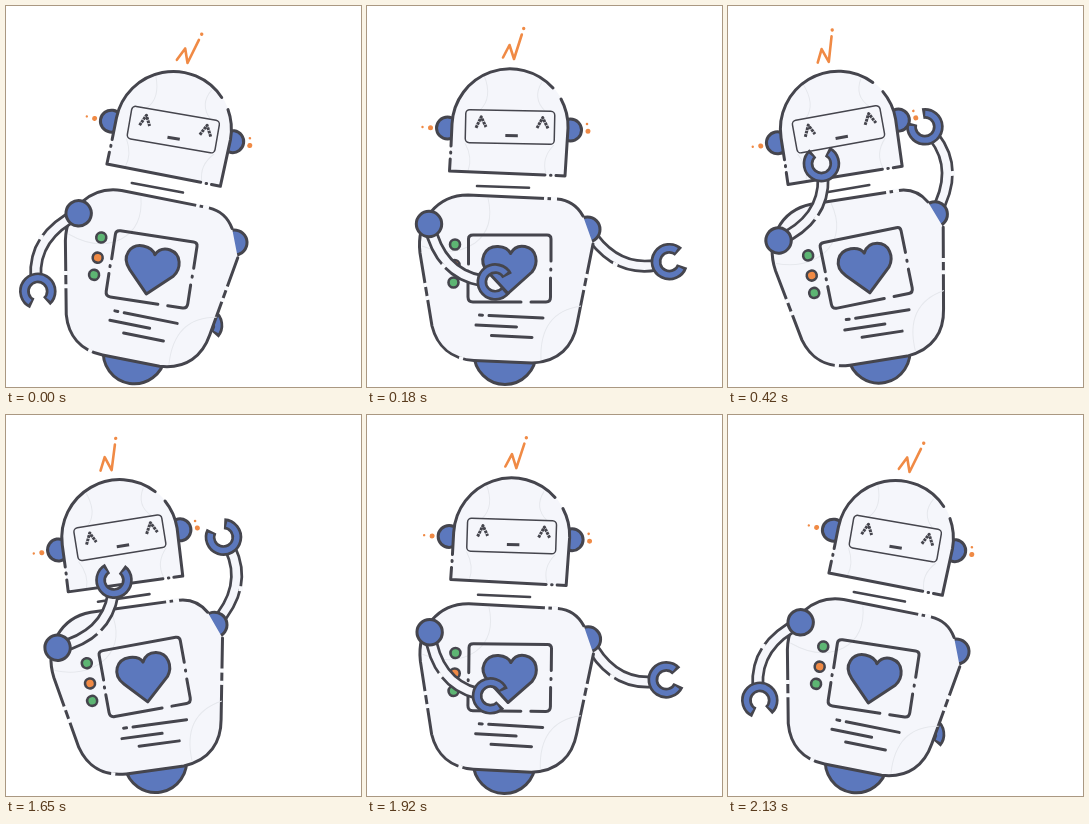
An HTML page that plays this animation: 355 by 381 pixels, repeating every 2610 ms.

```html
<!DOCTYPE html>
<html lang="en">
<head>
<meta charset="utf-8">
<title>Robot</title>
<style>
  html, body { margin: 0; width: 100%; height: 100%; overflow: hidden; background: #fff; }
  svg { display: block; }
  .line { fill: none; stroke: #45454d; stroke-width: 3; stroke-linecap: round; stroke-linejoin: round; }
  .thin { stroke-width: 1.5; }
  .flat { stroke-linecap: butt; }
  .shell { fill: #f5f6fb; }
  .blue { fill: #5c78bd; stroke: #45454d; stroke-width: 3; stroke-linejoin: round; }
  .gap { fill: none; stroke: #f8f9fc; stroke-width: 4.4; }
  .faint { fill: none; stroke: #e6e8ed; }
  .orange { fill: #f08a45; }
  .light { stroke: #45454d; stroke-width: 2.6; }
  .green { fill: #5db573; }
  .bolt { fill: none; stroke: #f08a45; stroke-width: 2.6; stroke-linecap: round; stroke-linejoin: round; }
</style>
</head>
<body>
<svg width="355" height="381" viewBox="0 0 355 381">
  <defs>
    <g id="limb">
      <path d="M0 0Q41 30 77 8" fill="none" stroke="#45454d" stroke-width="13"/>
      <path d="M0 0Q41 30 77 8" fill="none" stroke="#f5f6fb" stroke-width="7.6"/>
      <path class="gap" d="M36 22.5h5"/>
      <g id="claw" transform="translate(88 0) rotate(-36)" fill="none"></g>
    </g>
  </defs>
  <g id="robot">
    <g transform="translate(220.5 223.5)">
      <use id="rightArm" href="#limb"/>
      <circle class="blue" r="12.5"/>
    </g>
    <circle class="blue" cx="138" cy="347.5" r="31"/>

    <path class="line shell" style="fill:#f5f6fb" d="M226 238L210 318C206 340 192 356 165 357L107 354.5C84 353 70 340 65 320L53 247C49 215 70 189 101 189L190 193C203 194 211 201 216 210"/>
    <path class="faint" d="M121 192Q128 222 108 237Q86 252 55 240M214 300Q172 306 174 354"/>
    <path class="gap" d="M177 192.4l3.5 .2M184 192.7l6 .3M57.8 277l.7 4M60 290l.7 4M220 268l-.8 4M217.6 280l-.8 4M92 352l4 1.2"/>

    <path class="line" d="M101.5 258V233Q101.5 229 106 229H180Q184 229 184 233V255M183.8 263v1M183.5 272V291Q183.5 296 179 296H164M154 296H106Q101 296 101 291V273M101 265v1"/>
    <path class="blue" d="M141 287.5L121 266C110 254 118 240 131 240.5C138 241 142 244 143.5 247.5C147 241 153 239.5 158 240.5C170 243 172 257 165 266Z"/>
    <path class="line" d="M112.5 309l3 .2M122 309.5l54 2.5M109 319l40.5 2M124.5 329.5l40.5 2"/>
    <circle class="light green" cx="88" cy="238.5" r="5"/>
    <circle class="light orange" cx="87.5" cy="259" r="5"/>
    <circle class="light green" cx="86.5" cy="276.5" r="5"/>

    <path class="line" style="stroke-width:2.6" d="M110 180l52 1.8"/>
    <circle class="blue" cx="80.5" cy="122" r="11"/>
    <circle class="blue" cx="203.5" cy="124" r="11"/>
    <path class="shell" d="M82.5 165L85 118A58 58 0 0 1 201 122L198 170Z"/>
    <path class="faint" d="M117 69Q126 92 113 104M175 76Q165 92 178 105M98 137Q106 152 101 165M187 139Q174 152 179 168"/>
    <path class="line" d="M189 169.6L198 170L201 122A58 58 0 0 0 194 93M186 82A58 58 0 0 0 85 118L84 140M83.7 146v1M83.2 153L82.5 165L178 169M183.5 169.3h.5"/>
    <g transform="rotate(1.2 143 121)">
      <rect class="line thin" x="98.5" y="104.5" width="89" height="33" rx="4"/>
      <path class="line flat" stroke-dasharray="2.8 .7" d="M109 122.5L114 111.5L119 121.5M170 121.5L175.5 111L181 121.5"/>
      <path class="line flat" d="M138.5 129.5h12.5"/>
    </g>

    <path class="bolt" d="M136 51.5L142.5 39L147 53L154.8 28.5"/>
    <g class="orange">
      <circle cx="156.7" cy="22.5" r="1.7"/>
      <circle cx="63.5" cy="121.8" r="2.5"/>
      <circle cx="55.5" cy="121" r="1.2"/>
      <circle cx="221" cy="125.3" r="2.5"/>
      <circle cx="220" cy="118" r="1.3"/>
    </g>

    <g transform="translate(62 218)">
      <use id="leftArm" href="#limb"/>
      <circle class="blue" r="12.7"/>
    </g>
  </g>
</svg>
<script>
  const byId = id => document.getElementById(id);
  const clamp = v => Math.min(1, Math.max(0, v));
  const LOOP = 2610, STEP = 30;

  // Open ring centred on the wrist, with its gap facing +x.
  function ring(halfGap, color, width) {
    const r = 13.4, a = halfGap * Math.PI / 180;
    const x = r * Math.cos(a), y = r * Math.sin(a);
    return `<path d="M${x} ${y}A${r} ${r} 0 1 1 ${x} ${-y}" stroke="${color}" stroke-width="${width}"/>`;
  }
  byId('claw').innerHTML = ring(33, '#45454d', 10.8) + ring(44, '#5c78bd', 5.4);

  // 0 = leaning right with arms down, 1 = leaning left with arms raised
  const pose = t => clamp(t / 420) - clamp((t - 1620) / 500);

  const turn = (id, angle, pivot = '') =>
    byId(id).setAttribute('transform', `rotate(${angle} ${pivot})`);

  const start = performance.now();
  function draw() {
    const t = (performance.now() - start) % LOOP;
    const p = pose(Math.floor(t / STEP) * STEP);
    turn('robot', 8.66 - 20.2 * p, '138 283');
    turn('leftArm', 109 - 158.3 * p);
    turn('rightArm', 101.3 - 186.3 * p);
    requestAnimationFrame(draw);
  }
  draw();
</script>
</body>
</html>
```
